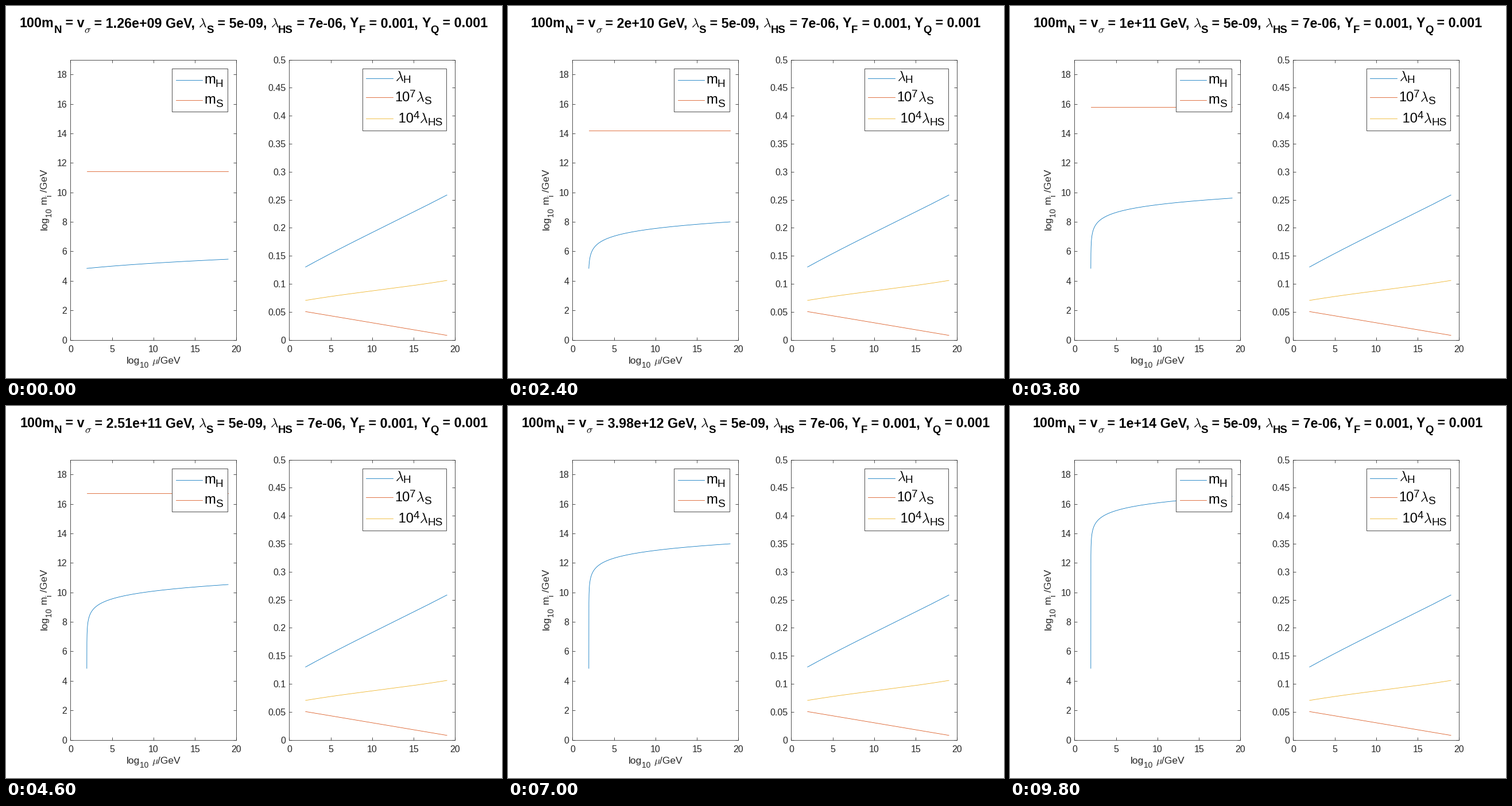
A matplotlib script for the animation above (10 s loop, 864 by 648 pixels).

```python
import numpy as np
import matplotlib.pyplot as plt
from matplotlib.animation import FuncAnimation
from matplotlib.patches import Rectangle

W, H = 864, 648
FRAMES, STEP = 50, 200
INK = "#262626"
BLUE, ORANGE, YELLOW = "#0072BD", "#D95319", "#EDB120"
TITLE, KEY, LABEL, TICK = 23.25, 23.8, 17.4, 16
LINE = 0.8
SUB = 0.8
NUDGE = 0.02  # keeps half-pixel lines snapping to their own pixel
GREEK = {"λ": (r"$\lambda$", 0.583), "σ": (r"$\sigma$", 0.571), "μ": (r"$\mu$", 0.603)}

plt.rcParams["font.family"] = "Liberation Sans"
fig = plt.figure(figsize=(W / 72, H / 72), dpi=72, facecolor="white")
probe = fig.text(0, 0, "", family="Liberation Sans")


def advance(text, size, weight):
    """Pen advance of a run, spaces included."""
    if text in GREEK:
        return GREEK[text][1] * size
    probe.set_fontsize(size)
    probe.set_fontweight(weight)
    widths = []
    for s in ("|" + text + "|", "||"):
        probe.set_text(s)
        widths.append(probe.get_window_extent().width)
    probe.set_text("")
    return widths[0] - widths[1]


def rich(x, y, runs, size, drop=0.0, rise=0.0, weight="normal",
         color="black", center=False, upright=True):
    """Lay out (text, level) runs; level -1 is a subscript, 1 a superscript."""
    sizes = [size * (SUB if level else 1) for _, level in runs]
    widths = [advance(t, s, weight) for (t, _), s in zip(runs, sizes)]
    pen = -sum(widths) / 2 if center else 0
    made = []
    for (text, level), s, w in zip(runs, sizes, widths):
        shift = {-1: drop, 0: 0, 1: -rise}[level]
        px, py = (x + pen, y + shift) if upright else (x + shift, y - pen)
        made.append(stage.text(
            px, py, GREEK[text][0] if text in GREEK else text,
            fontsize=s, fontweight=weight, color=color, math_fontfamily="cm",
            ha="left", va="baseline", rotation=0 if upright else 90,
            rotation_mode="anchor"))
        pen += w
    return made


def panel(left, ymax, step):
    left, top, bottom, width = left - NUDGE, 93.5 + NUDGE, 581.5 + NUDGE, 289
    ax = fig.add_axes([left / W, 1 - bottom / H, width / W, (bottom - top) / H])
    ax.set_xlim(0, 20)
    ax.set_ylim(0, ymax)
    ticks = np.arange(0, ymax + step / 100, step)
    ax.set_xticks(range(0, 21, 5))
    ax.set_yticks(ticks, [f"{t:.3g}" for t in ticks])
    ax.tick_params(direction="in", length=5, width=LINE, color=INK, labelcolor=INK,
                   labelsize=TICK, top=True, right=True)
    ax.tick_params(axis="x", pad=9)
    ax.tick_params(axis="y", pad=6)
    for spine in ax.spines.values():
        spine.set_color(INK)
        spine.set_linewidth(LINE)
    return ax


def legend(x, y, w, h, rows):
    stage.add_patch(Rectangle((x, y), w, h, fc="white", ec=INK, lw=LINE))
    for ly, color, x0, x1 in rows:
        stage.plot([x0, x1], [ly, ly], color=color, lw=LINE)


masses = panel(112.5, 19, 2)
couplings = panel(493.5, 0.5, 0.05)
stage = fig.add_axes([0, 0, 1, 1])
stage.axis("off")
stage.set_xlim(NUDGE, W + NUDGE)
stage.set_ylim(H - NUDGE, -NUDGE)

# Running couplings
X0, X1 = 1.96, 19.0
x = np.linspace(X0, X1, 200)
knots = [X0, 8, 13, X1]
for values, color in (([0.13, 0.1768, 0.2136, 0.2585], BLUE),
                      ([0.0504, 0.0354, 0.0229, 0.008], ORANGE),
                      ([0.0704, 0.0835, 0.0931, 0.106], YELLOW)):
    couplings.plot(x, np.polyval(np.polyfit(knots, values, 3), x), color=color, lw=LINE)

# Running masses, sampled densely near the threshold
d = (X1 - X0) * np.linspace(0, 1, 400) ** 4
SPAN = X1 - X0
base = 127.0 ** 2 * np.exp(0.0156 * d)
growth = np.exp(-31.434) * d / SPAN * np.exp(0.016 * (d - SPAN))
h_line, = masses.plot([], [], color=BLUE, lw=LINE)
s_line, = masses.plot([], [], color=ORANGE, lw=LINE)

legend(289.5, 108.5, 97, 75, [(128.5, BLUE, 296, 342), (163.5, ORANGE, 296, 342)])
legend(621.5, 108.5, 146, 108, [(125.5, BLUE, 627, 674), (158.5, ORANGE, 627, 674),
                                (195.5, YELLOW, 627, 674)])
rich(345, 135, [("m", 0), ("H", -1)], KEY, drop=6)
rich(345, 170, [("m", 0), ("S", -1)], KEY, drop=6)
rich(678, 130, [("λ", 0), ("H", -1)], KEY, drop=4)
rich(677, 166, [("10", 0), ("7", 1), ("λ", 0), ("S", -1)], KEY, drop=5, rise=7)
rich(677, 203, [(" 10", 0), ("4", 1), ("λ", 0), ("HS", -1)], KEY, drop=5, rise=7)

rich(257, 623, [("log", 0), ("10", -1), (" ", 0), ("μ", 0), ("/GeV", 0)],
     LABEL, drop=7, color=INK, center=True)
rich(72, 337, [("log", 0), ("10", -1), (" m", 0), ("i", -1), (" /GeV", 0)],
     LABEL, drop=7, color=INK, center=True, upright=False)

title = []


def update(i):
    v = 10 ** (9.1 + 0.1 * i)
    h_line.set_data(X0 + d, 0.5 * np.log(base + v ** 2 * growth))
    s = np.log(v) + 0.5 * np.log(5e-9) + 0.025
    s_line.set_data([X0, X1], [s, s])
    while title:
        title.pop().remove()
    title.extend(rich(431.5, 37, [
        ("100m", 0), ("N", -1), (" = v", 0), ("σ", -1), (f" = {v:.3g} GeV, ", 0),
        ("λ", 0), ("S", -1), (" = 5e-09, ", 0),
        ("λ", 0), ("HS", -1), (" = 7e-06, ", 0),
        ("Y", 0), ("F", -1), (" = 0.001, ", 0),
        ("Y", 0), ("Q", -1), (" = 0.001", 0)],
        TITLE, drop=10, weight="bold", center=True))
    return [h_line, s_line, *title]


anim = FuncAnimation(fig, update, frames=FRAMES, interval=STEP,
                     init_func=lambda: update(0), repeat=True, repeat_delay=0, blit=False)
plt.show()
```
